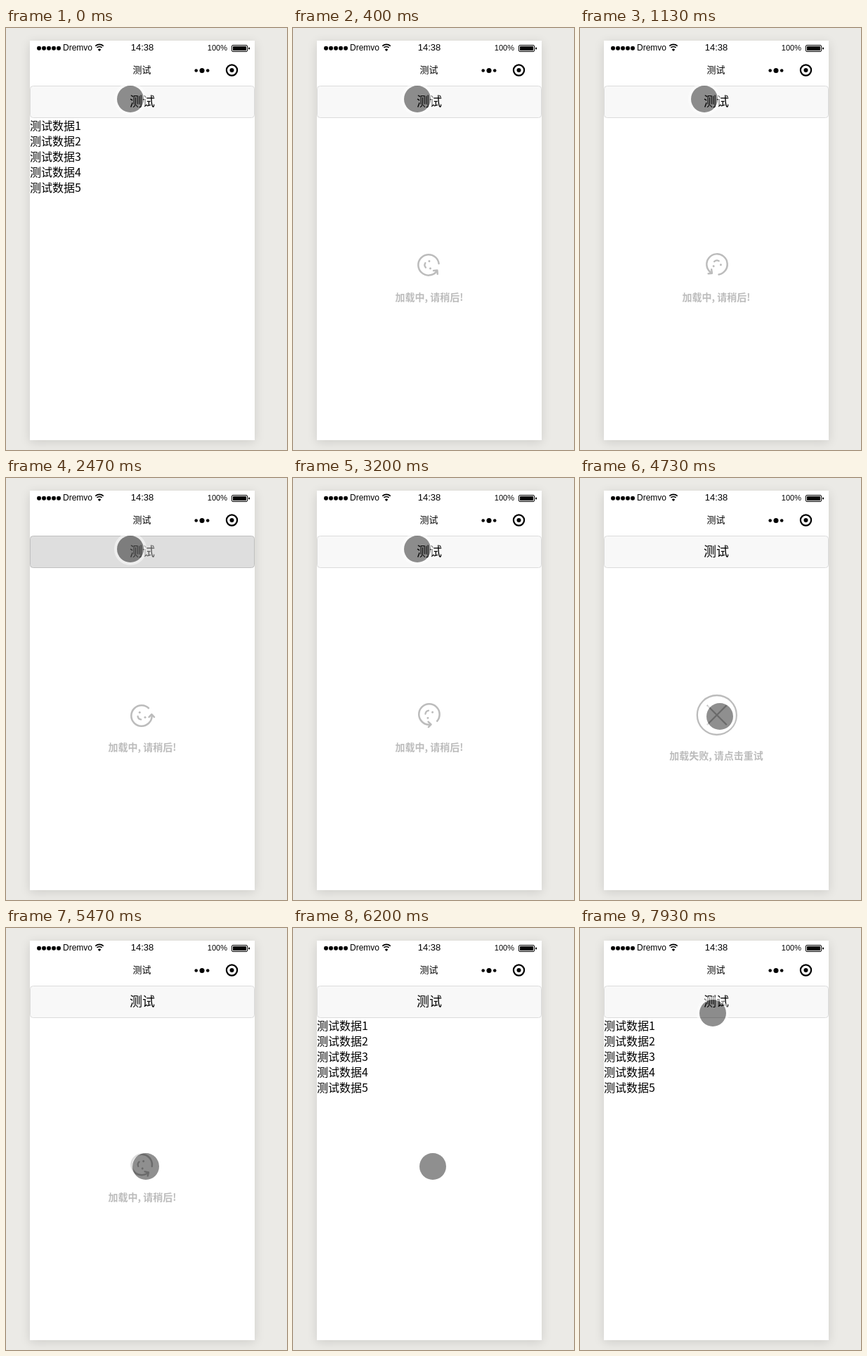
Write an HTML page with a canvas that moves like this. It is 400 px wide and 600 px high and loops after 8 s.

```html
<!DOCTYPE html>
<html lang="zh-CN">
<head>
<meta charset="utf-8">
<title>测试</title>
<style>
  html, body { margin: 0; width: 100%; height: 100%; overflow: hidden; background: #ebeae6; }
  canvas { display: block; width: 400px; height: 600px; }
</style>
</head>
<body>
<canvas id="stage"></canvas>
<script>
const LOOP = 8000, FRAME = 1000 / 15;
const CJK = '"Noto Sans CJK SC", "Noto Sans CJK", sans-serif';
const LATIN = '"Liberation Sans", Arial, sans-serif';
const GREY = '#bcbcbc';
const RAD = Math.PI / 180;

const canvas = document.getElementById('stage');
const ctx = canvas.getContext('2d');
const dpr = window.devicePixelRatio || 1;
canvas.width = 400 * dpr;
canvas.height = 600 * dpr;
ctx.scale(dpr, dpr);

// what the page shows, and since when
const VIEWS = [
  [0, 'list'], [70, 'loading'], [1330, 'failed'], [2470, 'loading'],
  [3470, 'failed'], [5000, 'loading'], [6200, 'list']
];
const PRESSES = [[70, 140], [2470, 2535]];
const MOVES = [
  { start: 4400, end: 4730, from: [177, 101], to: [199, 339] },
  { start: 7470, end: 7930, from: [199, 339], to: [189, 121] }
];

function dot(x, y, r, color) {
  ctx.fillStyle = color;
  ctx.beginPath();
  ctx.arc(x, y, r, 0, 2 * Math.PI);
  ctx.fill();
}

function arc(x, y, r, a, b, color, width) {
  ctx.strokeStyle = color;
  ctx.lineWidth = width;
  ctx.beginPath();
  ctx.arc(x, y, r, a * RAD, b * RAD);
  ctx.stroke();
}

function lines(points, color, width) {
  ctx.strokeStyle = color;
  ctx.lineWidth = width;
  ctx.beginPath();
  points.forEach(([x, y], i) => i ? ctx.lineTo(x, y) : ctx.moveTo(x, y));
  ctx.stroke();
}

function box(x, y, w, h, r, fill, stroke) {
  ctx.beginPath();
  ctx.roundRect(x, y, w, h, r);
  if (fill) { ctx.fillStyle = fill; ctx.fill(); }
  if (stroke) { ctx.strokeStyle = stroke; ctx.lineWidth = 1; ctx.stroke(); }
}

function text(str, x, y, font, align = 'left', color = '#000') {
  ctx.font = font;
  ctx.textAlign = align;
  ctx.fillStyle = color;
  ctx.fillText(str, x, y);
}

function drawPhone() {
  ctx.fillStyle = '#ebeae6';
  ctx.fillRect(0, 0, 400, 600);
  ctx.save();
  ctx.shadowColor = 'rgba(0,0,0,.12)';
  ctx.shadowBlur = 14 * dpr;
  ctx.shadowOffsetY = 3 * dpr;
  ctx.fillStyle = '#fff';
  ctx.fillRect(34, 18, 320, 568);
  ctx.restore();
}

function drawHeader() {
  for (let i = 0; i < 5; i++) dot(47 + 7 * i, 28.7, 3, '#000');
  text('Dremvo', 81, 32, '12px ' + LATIN);
  for (const r of [8.6, 5.4]) arc(133, 32, r, -132, -48, '#000', 1.7);
  ctx.fillStyle = '#000';
  ctx.beginPath();
  ctx.moveTo(133, 33);
  ctx.arc(133, 33, 3.2, -135 * RAD, -45 * RAD);
  ctx.fill();
  text('14:38', 194, 32, '13px ' + LATIN, 'center');
  text('100%', 315, 32, '11px ' + LATIN, 'right');
  box(321.5, 24.5, 22, 9, 1.5, null, '#000');
  box(323, 26, 19, 6, 0.5, '#000');
  box(345, 27.5, 2, 3, 1, '#000');

  text('测试', 193.5, 64.4, '13px ' + CJK, 'center');
  dot(270.7, 60.5, 2.3, '#000');
  dot(279, 60.5, 3.5, '#000');
  dot(287.2, 60.5, 2.3, '#000');
  arc(321.5, 60, 7.6, 0, 360, '#000', 2.2);
  dot(321.5, 60, 3, '#000');
}

function drawButton(pressed) {
  box(34.5, 82.5, 319, 45, 4, pressed ? '#dedede' : '#f8f8f8', pressed ? '#c0c0c0' : '#dcdcdc');
  text('测试', 194, 111.2, '18px ' + CJK, 'center', pressed ? 'rgba(0,0,0,.6)' : '#000');
}

function drawList() {
  for (let i = 0; i < 5; i++) text('测试数据' + (i + 1), 34, 145.2 + 22 * i, '16px ' + CJK);
}

function drawLoading(elapsed) {
  ctx.save();
  ctx.translate(194.5, 337.5);
  ctx.rotate(elapsed * 0.12 * RAD);
  ctx.translate(-1.5, 0.5);
  ctx.lineCap = ctx.lineJoin = 'round';
  arc(0, 0, 14.7, 2, 313, GREY, 2.5);
  lines([[10.6, 1.8], [14.4, -2], [18, 1.8]], GREY, 2.5);
  arc(0, 0, 5.5, 98, 172, GREY, 2.3);
  for (const a of [-120, 24]) dot(5.5 * Math.cos(a * RAD), 5.5 * Math.sin(a * RAD), 1.5, GREY);
  ctx.restore();
  text('加载中, 请稍后!', 194, 388.3, 'bold 14px ' + CJK, 'center', GREY);
}

function drawFailed() {
  arc(194.8, 337, 28, 0, 360, GREY, 2.3);
  lines([[180.8, 323], [208.8, 351]], GREY, 2.3);
  lines([[208.8, 323], [180.8, 351]], GREY, 2.3);
  text('加载失败, 请点击重试', 194, 400.4, 'bold 14px ' + CJK, 'center', GREY);
}

function pointerAt(t) {
  let [x, y] = MOVES[0].from;
  for (const { start, end, from, to } of MOVES) {
    if (t < start) break;
    const p = Math.min(1, (t - start) / (end - start));
    const e = p * p * (3 - 2 * p);
    x = from[0] + (to[0] - from[0]) * e;
    y = from[1] + (to[1] - from[1]) * e;
  }
  return [x, y];
}

function drawPointer(x, y) {
  arc(x, y, 21, 0, 360, 'rgba(255,255,255,.5)', 4);
  dot(x, y, 19, 'rgba(0,0,0,.44)');
}

function draw(time) {
  const t = Math.round(Math.floor((time + 4) / FRAME) * FRAME / 10) * 10;
  const [since, view] = VIEWS.filter(v => v[0] <= t).pop();
  drawPhone();
  drawHeader();
  drawButton(PRESSES.some(([a, b]) => t >= a && t < b));
  if (view === 'list') drawList();
  else if (view === 'loading') drawLoading(t - since);
  else drawFailed();
  drawPointer(...pointerAt(t));
}

const begin = performance.now();
function tick() {
  draw((performance.now() - begin) % LOOP);
  requestAnimationFrame(tick);
}
tick();
</script>
</body>
</html>
```
